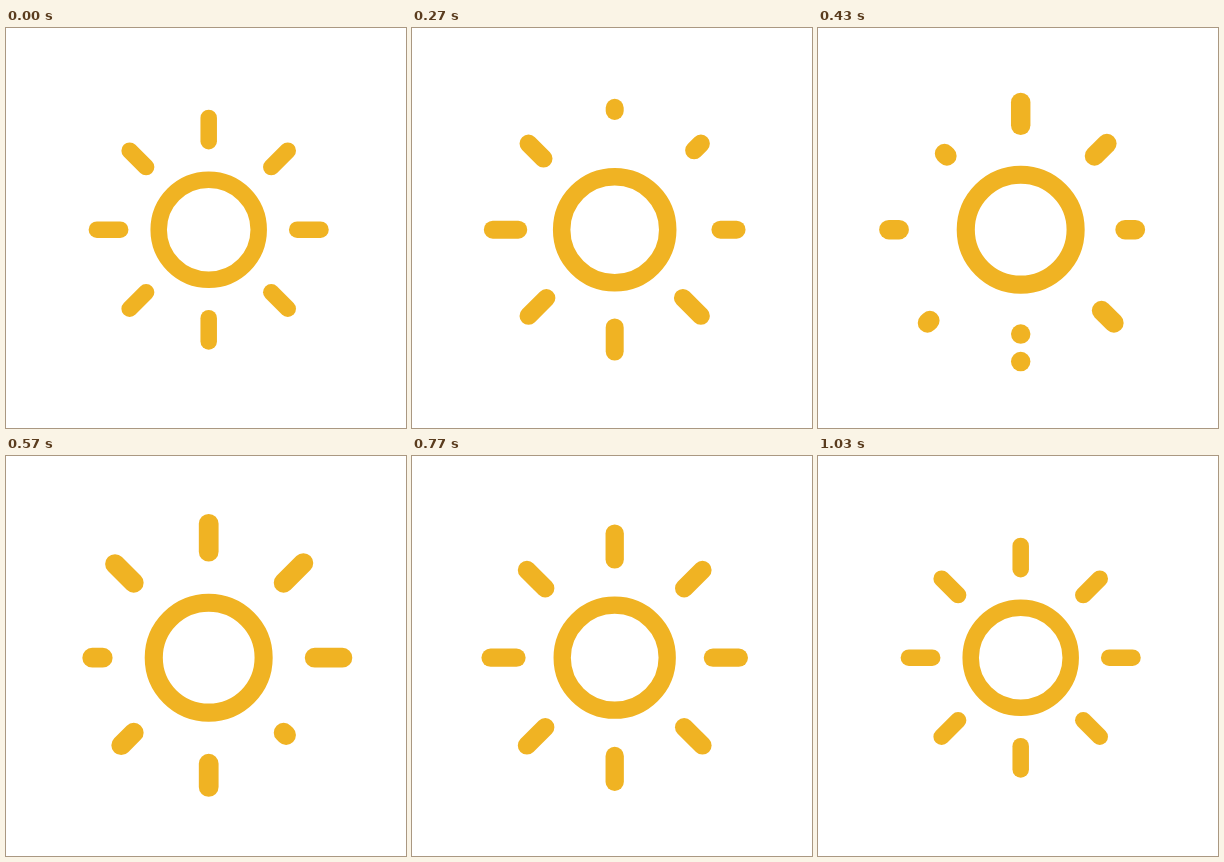
These frames come from a looping animation (400 px wide and 400 px high, 1070 ms). An HTML page with a canvas:

```html
<!DOCTYPE html>
<html lang="en">
<head>
<meta charset="utf-8">
<title>Shining sun</title>
<style>
  html, body { margin: 0; width: 100%; height: 100%; overflow: hidden; background: #fff; }
  canvas { display: block; }
</style>
</head>
<body>
<canvas id="stage" width="400" height="400"></canvas>
<script>
const ctx = document.getElementById('stage').getContext('2d');
const LOOP = 1070, STEP = 100 / 3, LAST = 31;
const CENTER = [202.7, 201.7];
const INNER = 88.5, OUTER = 111.8, WIDTH = 16.5, RADIUS = 50;
// Eighth-turns clockwise from the top, in the order the rays are redrawn
const ORDER = [0, 1, 2, 7, 4, 5, 6, 3];

const smooth = x => {
  x = Math.min(1, Math.max(0, x));
  return x * x * (3 - 2 * x);
};

function line(from, to) {
  const y = part => -(INNER + (OUTER - INNER) * part);
  ctx.beginPath();
  ctx.moveTo(0, y(from));
  // A hair of length keeps the round caps on an empty line
  ctx.lineTo(0, y(to) - 0.01);
  ctx.stroke();
}

// Each ray drains outwards, then regrows from its inner end.
function ray(age) {
  const near = Math.max(0, 1 - Math.abs(age) / 7);
  const left = 1 - smooth(near ** 1.6);
  if (age <= 0) line(1 - left, 1);
  if (age >= 0) line(0, left);
}

function draw(step) {
  ctx.setTransform(1, 0, 0, 1, 0, 0);
  ctx.fillStyle = '#fff';
  ctx.fillRect(0, 0, 400, 400);
  ctx.translate(...CENTER);
  ctx.strokeStyle = '#f0b323';
  ctx.lineWidth = WIDTH;
  ctx.lineCap = 'round';

  const disc = 1 + 0.1 * smooth((15 - Math.abs(step - 15)) / 14);
  ctx.save();
  ctx.scale(disc, disc);
  ctx.beginPath();
  ctx.arc(0, 0, RADIUS, 0, 2 * Math.PI);
  ctx.stroke();
  ctx.restore();

  const spread = 1 + 0.2 * smooth(1 - Math.abs(step - 16) / 15);
  ctx.scale(spread, spread);
  ORDER.forEach((turn, i) => {
    ctx.save();
    ctx.rotate(turn * Math.PI / 4);
    ray(step - 9 - i);
    ctx.restore();
  });
}

function tick() {
  const time = performance.now() % LOOP;
  draw(Math.min(LAST, Math.floor((time + 3.4) / STEP)));
  requestAnimationFrame(tick);
}
tick();
</script>
</body>
</html>
```
